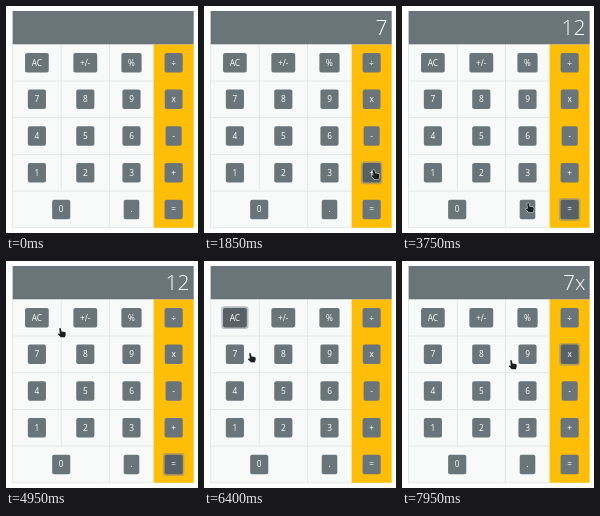
An HTML page with a canvas for the animation above (8 s loop, 192x227 px).

```html
<!DOCTYPE html>
<html lang="en">
<head>
<meta charset="utf-8">
<title>Calculator</title>
<style>
html, body { margin: 0; width: 100%; height: 100%; overflow: hidden; background: #fff; }
canvas { display: block; width: 192px; height: 227px; }
</style>
</head>
<body>
<canvas id="stage"></canvas>
<script>
const W = 192, H = 227, LOOP = 8000, STEP = 50;
const FONT = '"Open Sans", "Noto Sans", sans-serif';
const GREY = '#6a7579', DARK = '#586165', YELLOW = '#febe08', LINE = '#dfe3e1';
const canvas = document.getElementById('stage');
const ctx = canvas.getContext('2d');
const dpr = window.devicePixelRatio || 1;
canvas.width = W * dpr;
canvas.height = H * dpr;

const cols = [6.6, 55.2, 103.4, 147.6, 187.7];
const TOP = 38.3, ROW = 36.7, BOTTOM = TOP + 5 * ROW;

// '0' spans two columns
const keys = {};
['AC +/- % ÷', '7 8 9 x', '4 5 6 -', '1 2 3 +', '0 0 . ='].forEach((row, r) =>
  row.split(' ').forEach((label, c) => {
    const x = label === '0' ? cols[1] : (cols[c] + cols[c + 1]) / 2;
    keys[label] = { label, x, y: TOP + ROW * (r + 0.5) };
  }));

// Pointer script: key presses, and free points passed on the way
const ARRIVE = 250, LEAVE = 100, SHOW = 80;
const script = [
  { at: 50, x: 140, y: 100 },
  { at: 700, key: '7' }, { at: 1850, key: '+' },
  { at: 2500, key: '5' }, { at: 3150, key: '=' },
  { at: 3750, x: 126, y: 197 }, { at: 4950, x: 54, y: 67 },
  { at: 5650, key: 'AC' }, { at: 6400, x: 46, y: 92 },
  { at: 6850, key: '7' }, { at: 7700, key: 'x' },
  { at: 7950, x: 109, y: 99 }
];
const stops = script.map(({ at, key, x, y }) => key
  ? { from: at - ARRIVE, to: at + LEAVE, x: keys[key].x + 2, y: keys[key].y - 3 }
  : { from: at, to: at, x, y });

const pressed = t => script.filter(s => s.key && s.at <= t).map(s => s.key);
const ease = k => k * k * (3 - 2 * k);

function enter(text, key) {
  if (key === 'AC') return '';
  if (key === '=') return String(text.split('+').reduce((sum, n) => sum + Number(n), 0));
  return text + key;
}

function pointerAt(t) {
  if (t < stops[0].from) return null;
  const i = stops.findIndex(s => s.from > t);
  if (i < 0) return stops[stops.length - 1];
  const a = stops[i - 1], b = stops[i];
  const k = ease(Math.max(0, (t - a.to) / (b.from - a.to)));
  return { x: a.x + (b.x - a.x) * k, y: a.y + (b.y - a.y) * k };
}

function rect(x, y, w, h, color) {
  ctx.fillStyle = color;
  ctx.fillRect(x, y, w, h);
}

function box(x, y, w, h, r, color) {
  ctx.beginPath();
  ctx.roundRect(x, y, w, h, r);
  ctx.fillStyle = color;
  ctx.fill();
}

function drawGrid() {
  const [left, c1, c2, c3, right] = cols;
  rect(0, 0, W, H, '#fff');
  rect(left, TOP, c3 - left, BOTTOM - TOP, '#f7faf8');
  for (let r = 1; r <= 5; r++) rect(left, TOP + r * ROW - 0.4, c3 - left, 0.8, LINE);
  for (const x of [left, c1, c2]) {
    const rows = x === c1 ? 4 : 5;
    rect(x - 0.4, TOP, 0.8, rows * ROW, LINE);
  }
  rect(c3, TOP, right - c3, BOTTOM - TOP, YELLOW);
  rect(left, 5, right - left, TOP - 5, GREY);
}

function drawKey({ label, x, y }, focused) {
  ctx.font = '500 8.3px ' + FONT;
  const w = ctx.measureText(label).width + 13.4, h = 19.5;
  if (focused) box(x - w / 2 - 1.7, y - h / 2 - 1.7, w + 3.4, h + 3.4, 3, 'rgba(130,138,145,.55)');
  box(x - w / 2, y - h / 2, w, h, 2, focused ? DARK : GREY);
  ctx.fillStyle = '#fff';
  ctx.textAlign = 'center';
  ctx.fillText(label, x, y + 3);
}

function drawPointer({ x, y }) {
  ctx.save();
  ctx.translate(x, y);
  ctx.scale(0.95, 0.95);
  ctx.beginPath();
  ctx.moveTo(-0.8, 0.7);
  ctx.quadraticCurveTo(0.1, -0.5, 1, 0.7);
  ctx.lineTo(1.5, 3.6);
  ctx.lineTo(5, 4.1);
  ctx.quadraticCurveTo(6.3, 4.5, 6.1, 6.2);
  ctx.lineTo(5.2, 9.7);
  ctx.lineTo(0.8, 9.7);
  ctx.lineTo(-2.2, 6.5);
  ctx.quadraticCurveTo(-2, 5.3, -0.2, 6);
  ctx.closePath();
  ctx.lineJoin = 'round';
  ctx.lineWidth = 1.2;
  ctx.strokeStyle = 'rgba(240,242,240,.8)';
  ctx.stroke();
  ctx.fillStyle = '#1c1f21';
  ctx.fill();
  ctx.restore();
}

function draw(t) {
  ctx.setTransform(dpr, 0, 0, dpr, 0, 0);
  drawGrid();
  const active = pressed(t).pop();
  for (const key of Object.values(keys)) drawKey(key, key.label === active);
  ctx.font = '300 21px ' + FONT;
  ctx.fillStyle = '#fff';
  ctx.textAlign = 'right';
  ctx.fillText(pressed(t - SHOW).reduce(enter, ''), 183.5, 29.2);
  const pointer = pointerAt(t);
  if (pointer) drawPointer(pointer);
}

const start = performance.now();
function tick() {
  const t = (performance.now() - start) % LOOP;
  draw(Math.floor(t / STEP) * STEP);
  requestAnimationFrame(tick);
}
tick();
</script>
</body>
</html>
```
